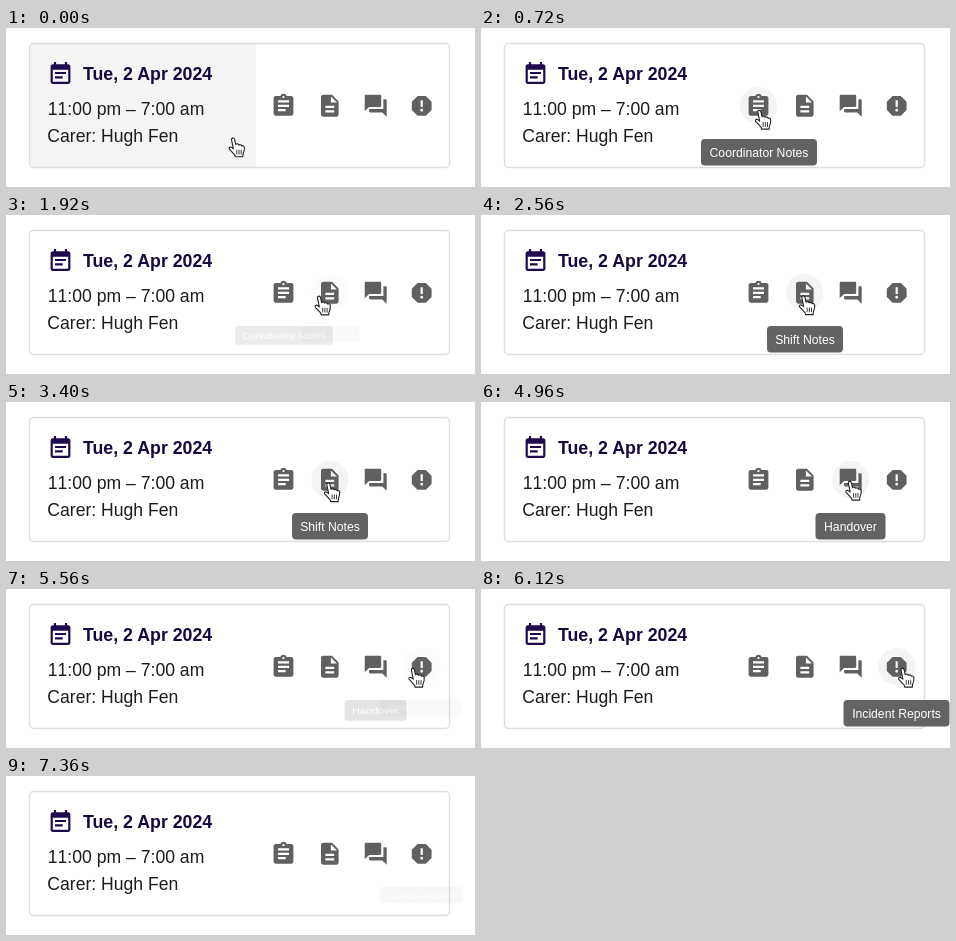
An HTML page for the animation above (7400 ms loop, 469 by 159 pixels).

```html
<!DOCTYPE html>
<html lang="en">
<head>
<meta charset="utf-8">
<title>Shift card</title>
<style>
  html, body { margin: 0; width: 100%; height: 100%; overflow: hidden; background: #fff; }
  svg { display: block; width: 469px; height: 159px; font-family: "Liberation Sans", Arial, sans-serif; }
  .text { font-size: 17.6px; fill: #1c1c1c; font-kerning: none; }
  .date { font-size: 17.75px; font-weight: bold; fill: #180840; }
  .tip rect { fill: #636363; }
  .tip text { font-size: 12.2px; fill: #fff; text-anchor: middle; }
</style>
</head>
<body>
<svg viewBox="0 0 469 159">
  <rect id="panel" x="24" y="16" width="226" height="123" fill="#f4f4f4"/>
  <rect x="23.5" y="15.5" width="420" height="124" rx="4" fill="none" stroke="#dedede" stroke-width="1.4"/>
  <path fill="#200a4e" transform="translate(41.3 32.9) scale(1.1)" d="M17 10H7v2h10v-2zm2-7h-1V1h-2v2H8V1H6v2H5c-1.11 0-1.99.9-1.99 2L3 19c0 1.1.89 2 2 2h14c1.1 0 2-.9 2-2V5c0-1.1-.9-2-2-2zm0 16H5V8h14v11zm-5-5H7v2h7v-2z"/>
  <text class="date" x="77" y="52">Tue, 2 Apr 2024</text>
  <text class="text" x="41.8" y="87.3">11:00 pm – 7:00 am</text>
  <text class="text" x="41.3" y="114">Carer: Hugh Fen</text>
  <g id="icons"></g>
  <g id="tips"></g>
  <g id="hand" fill="#fff" stroke="#222" stroke-width="1.1" stroke-linejoin="round" stroke-linecap="round">
    <path d="M-1.6 2C-2.2-.4.8-.9 1.4 1.2L2.5 6.2C3.3 5.2 5.2 5.4 5.6 6.8C6.6 6 8.2 6.4 8.5 7.7C9.8 7 11.2 7.8 11.2 9.4C11.4 12.5 10.6 14 9.8 16L9.6 18.6H2L1.8 17C.2 15-1.6 13.4-3.6 11.2C-5 9.3-3 8.2-1.4 9.4L.2 10.6Z"/>
    <path d="M3.6 12v3.8M5.8 12v3.8M8 12v3.8" stroke-width=".9"/>
  </g>
</svg>
<script>
const LOOP = 7400;
const $ = id => document.getElementById(id);

// x: icon centre; box: tooltip left and width; on/off: tooltip times
const items = [
  { label: "Coordinator Notes", x: 277.5, box: [220, 116], on: 420, off: 1800,
    d: "M19 3h-4.18C14.4 1.84 13.3 1 12 1c-1.3 0-2.4.84-2.82 2H5c-1.1 0-2 .9-2 2v14c0 1.1.9 2 2 2h14c1.1 0 2-.9 2-2V5c0-1.1-.9-2-2-2zm-7 0c.55 0 1 .45 1 1s-.45 1-1 1-1-.45-1-1 .45-1 1-1zm2 14H7v-2h7v2zm3-4H7v-2h10v2zm0-4H7V7h10v2z" },
  { label: "Shift Notes", x: 323.8, box: [286, 76], on: 1900, off: 3680,
    d: "M14 2H6c-1.1 0-1.99.9-1.99 2L4 20c0 1.1.89 2 1.99 2H18c1.1 0 2-.9 2-2V8l-6-6zm2 16H8v-2h8v2zm0-4H8v-2h8v2zm-3-5V3.5L18.5 9H13z" },
  { label: "Handover", x: 369.7, box: [334.5, 70], on: 3784, off: 5450,
    d: "M21 6h-2v9H6v2c0 .55.45 1 1 1h11l4 4V7c0-.55-.45-1-1-1zm-4 6V3c0-.55-.45-1-1-1H3c-.55 0-1 .45-1 1v14l4-4h10c.55 0 1-.45 1-1z" },
  { label: "Incident Reports", x: 415.7, box: [362.5, 106], on: 5540, off: 7210,
    d: "M15.73 3H8.27L3 8.27v7.46L8.27 21h7.46L21 15.73V8.27L15.73 3zM12 17.3c-.72 0-1.3-.58-1.3-1.3 0-.72.58-1.3 1.3-1.3.72 0 1.3.58 1.3 1.3 0 .72-.58 1.3-1.3 1.3zm1-4.3h-2V7h2v6z" }
];

// Cursor moves: start, end, target x, target y
const moves = [
  [120, 520, 278.5, 82.5],
  [1640, 2040, 322.5, 81],
  [3555, 3900, 369, 79.5],
  [5300, 5700, 421.7, 79.5],
  [7110, 7350, 482, 84]
];

$("icons").innerHTML = items.map(i =>
  `<circle cx="${i.x}" cy="77.6" r="18.5" fill="#f4f4f4"/>
   <path fill="#606060" transform="translate(${i.x - 13.2} 64.6) scale(1.1)" d="${i.d}"/>`).join("");
$("tips").innerHTML = items.map(({ label, box: [x, w] }) =>
  `<g class="tip"><rect x="${x}" y="111" width="${w}" height="26.5" rx="4"/>
   <text x="${x + w / 2}" y="128.6">${label}</text></g>`).join("");
const circles = document.querySelectorAll("#icons circle");
const tips = document.querySelectorAll(".tip");

const ramp = (t, start, length) => Math.min(1, Math.max(0, (t - start) / length));
const smooth = p => p * p * (3 - 2 * p);

// cubic-bezier(.4, 0, .2, 1)
function ease(p) {
  let lo = 0, hi = 1, u;
  for (let n = 0; n < 20; n++) {
    u = (lo + hi) / 2;
    const x = 1.2 * u * (1 - u) ** 2 + .6 * u * u * (1 - u) + u ** 3;
    if (x < p) lo = u; else hi = u;
  }
  return smooth(u);
}
const eased = (t, start, length) => ease(ramp(t, start, length));

function draw(t) {
  $("panel").setAttribute("opacity", 1 - eased(t, 300, 150));

  items.forEach(({ box: [x, w], on, off }, k) => {
    circles[k].setAttribute("opacity", eased(t, on - 20, 150) - eased(t, off, 150));
    const scale = .75 + .25 * (eased(t, on, 133) - eased(t, off + 67, 133));
    const cx = x + w / 2;
    tips[k].setAttribute("opacity", eased(t, on, 200) - eased(t, off, 200));
    tips[k].setAttribute("transform",
      `translate(${cx} 111) scale(${scale} ${scale * scale}) translate(${-cx} -111)`);
  });

  let x = 227.2, y = 110.2;
  for (const [start, end, toX, toY] of moves) {
    const p = smooth(ramp(t, start, end - start));
    x += (toX - x) * p;
    y += (toY - y) * p;
  }
  $("hand").setAttribute("transform", `translate(${x} ${y})`);
}

const begin = performance.now();
function frame() {
  draw((performance.now() - begin) % LOOP);
  requestAnimationFrame(frame);
}
frame();
</script>
</body>
</html>
```
